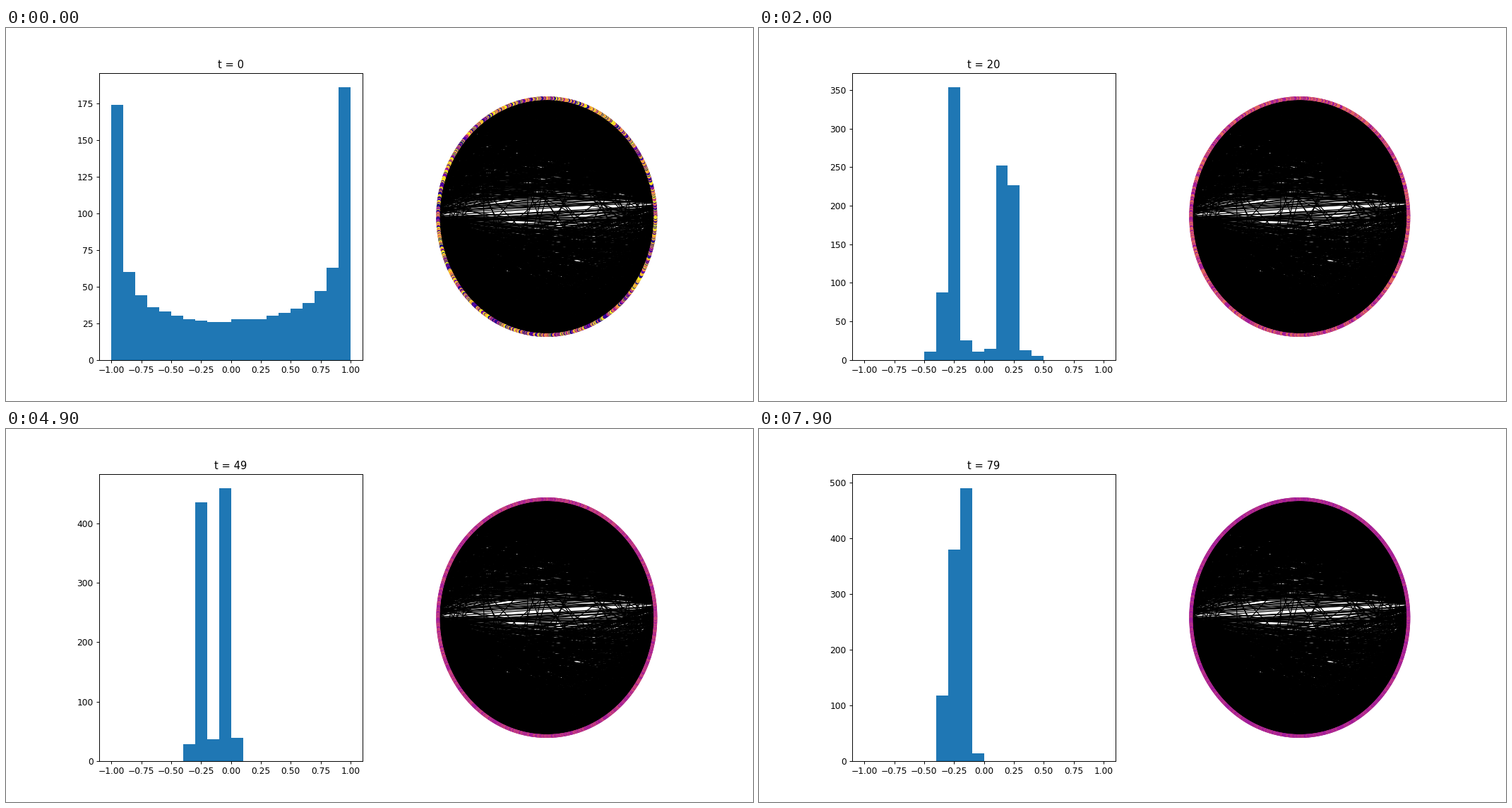
A matplotlib script that plays this animation: 1058x529 px, repeating every 8 s.

```python
import numpy as np
import matplotlib.pyplot as plt
from matplotlib.animation import FuncAnimation
from matplotlib.collections import LineCollection

N = 1000
LOW = 484          # nodes that start below zero
FRAMES = 80
SETTLE = 7         # steps until two opinion clusters have formed
BINS = np.linspace(-1, 1, 21)

# Paths of the two cluster centres at a few times.
TIMES = [7, 20, 31, 42, 57, 79]
LOW_PATH = [-0.44, -0.271, -0.25, -0.25, -0.26, -0.289]
HIGH_PATH = [0.4815, 0.198, 0.0605, -0.0054, -0.073, -0.153]

rng = np.random.default_rng(12)


def ranks(n):
    return (np.arange(n) + 0.5) / n


p = np.concatenate((ranks(LOW), ranks(N - LOW)))
is_low = np.arange(N) < LOW

# Start: states crowd towards -1 and 1.
v = np.where(is_low, p - 1, p)
start = np.sin(np.pi / 2 * v * (1 + 0.193 * (1 - v**2)))

# Heavy-tailed scatter inside a cluster (Student t with 2 degrees of freedom).
scatter = np.clip((2 * p - 1) / np.sqrt(2 * p * (1 - p)), -8, 8)


def state(t):
    """Sorted node states at step t."""
    low, high = (np.interp(np.sqrt(t), np.sqrt(TIMES), path)
                 for path in (LOW_PATH, HIGH_PATH))
    width = 0.155 * max(t, SETTLE) ** -0.57
    cluster = np.where(is_low, low, high) + width * scatter
    mix = max(0, 1 - t / SETTLE) ** 2
    return cluster + mix * (start - cluster)


def community(first, size, thin, m=4):
    """Edges of a growing network in which early nodes become hubs.

    Of the edges spanning almost the whole community, a share is left out.
    """
    edges = []
    for i in range(m, size):
        w = (np.arange(i) + 1.0) ** -0.5
        for j in rng.choice(i, m, replace=False, p=w / w.sum()):
            if i - j < size - 26 or rng.random() > thin:
                edges.append((first + i, first + j))
    return edges


rank = rng.permutation(N)
theta = 2 * np.pi * np.arange(N) / N
pos = np.column_stack((np.cos(theta), np.sin(theta)))

edges = community(18, 482, 0.5) + community(500, 518, 0)
edges += list(zip(rng.integers(18, 500, 60), rng.integers(500, 1018, 60)))

fig = plt.figure(figsize=(12, 6), dpi=88.16667)
fig.subplots_adjust(top=0.8785)
net = fig.add_subplot(1, 2, 2)
net.set(xlim=(-1.21, 1.21), ylim=(-1.21, 1.21))
net.axis("off")

# The edges never change, so they are drawn once and kept as a backdrop.
lines = net.add_collection(
    LineCollection(pos[np.array(edges) % N], colors="black", linewidths=1))
fig.canvas.draw()
backdrop = np.array(fig.canvas.buffer_rgba())
lines.remove()
fig.figimage(backdrop, origin="upper", zorder=-1)

nodes = net.scatter(*pos.T, s=10, c=np.zeros(N), cmap="plasma",
                    vmin=-1, vmax=1, linewidths=1, edgecolors="face")
hist = fig.add_subplot(1, 2, 1)


def update(t):
    x = state(t)
    hist.clear()
    hist.hist(x, bins=BINS)
    hist.set_title(f"t = {t}")
    nodes.set_array(x[rank])
    return []


anim = FuncAnimation(fig, update, frames=FRAMES, interval=100,
                     init_func=lambda: update(0), repeat=True)
plt.show()
```
